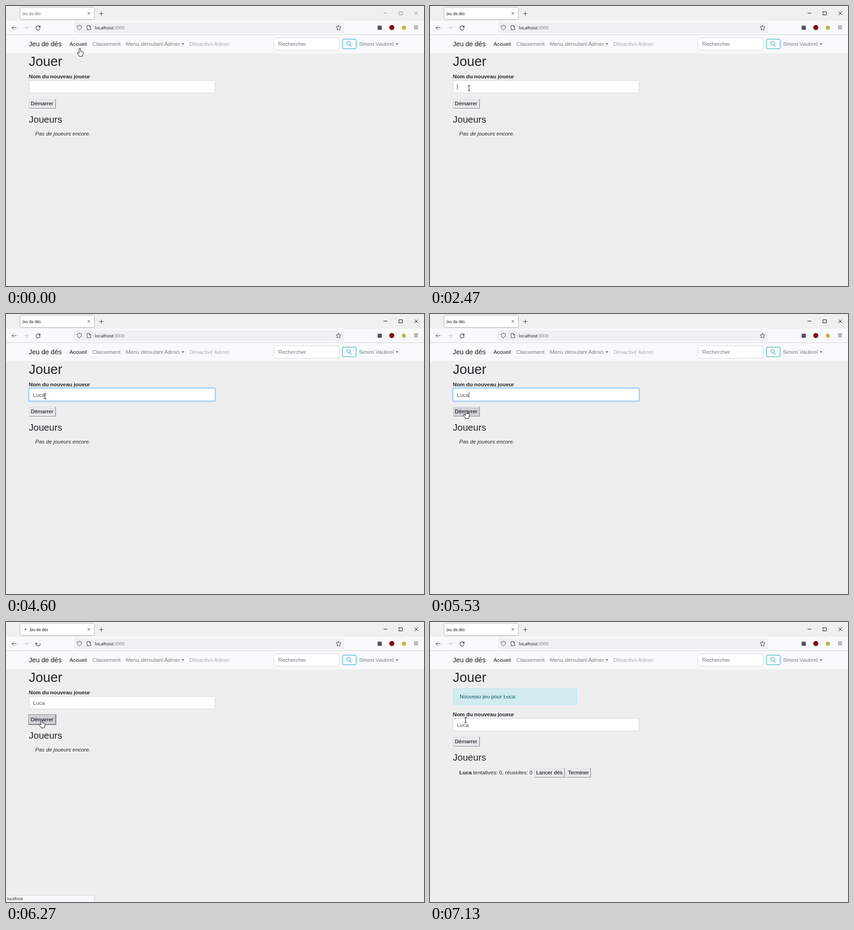
An HTML page for the animation above (8 s loop, 915 px wide and 612 px high).

```html
<!DOCTYPE html>
<html lang="fr">
<head>
<meta charset="utf-8">
<title>Jeu de dés</title>
<style>
  html, body { margin: 0; width: 100%; height: 100%; overflow: hidden; background: #eee; }
  svg { display: block; width: 915px; height: 612px; }
  text { font: 11.73px "Liberation Sans", Arial, sans-serif; fill: #212529; white-space: pre; }
  .ui { font-family: "Open Sans", "Noto Sans", sans-serif; font-size: 8.3px; fill: #0c0c0d; }
  .line { fill: none; stroke: #3d3d45; stroke-linecap: round; stroke-linejoin: round; }
  .input { fill: #fff; stroke: #ced4da; }
  .muted { fill: #7c7d7d; }
  .bold { font-weight: bold; }
  .cursor { fill: #fff; stroke: #000; stroke-linejoin: round; }
</style>
</head>
<body>
<svg viewBox="0 0 915 612">
  <!-- Browser chrome -->
  <rect width="915" height="32" fill="#f0f0f1"/>
  <rect y="32" width="915" height="30" fill="#f9f9fb"/>
  <rect y="62" width="915" height="1" fill="#d2d2d5"/>
  <rect x="30" y="2.5" width="164" height="28" rx="3.5" fill="#ddd"/>
  <rect x="30.5" y="2.5" width="163" height="27" rx="3" fill="#fff" stroke="#b0b0b4"/>
  <clipPath id="tabClip"><rect x="31" y="3" width="162" height="26" rx="3"/></clipPath>
  <g clip-path="url(#tabClip)"><circle id="burst" cx="42" cy="16" fill="#0a86e2"/></g>
  <circle id="throbber" cy="16.3" r="1.5" fill="#33333a"/>
  <text id="tabTitle" class="ui" y="19.5">Jeu de dés</text>
  <path class="line" d="M179 13.5l5 5m0-5l-5 5M204.5 16.5h8m-4 -4v8"/>
  <path id="windowButtons" class="line" d="M827 15.5h7M860.5 12.5h7v7h-7zM894.5 12.5l7 7m0-7l-7 7"/>
  <path class="line" d="M22.5 47.5H13m4.2-4.2L13 47.5l4.2 4.2"/>
  <path class="line" d="M39.5 47.5H49m-4.2-4.2l4.2 4.2l-4.2 4.2" style="stroke:#bbbbc0"/>
  <g id="reload">
    <path id="reloadArc" class="line" d="M4.3 1.5A4.5 4.5 0 1 1 3-3.3" pathLength="1" stroke-dasharray="1 2" stroke-width="1.2"/>
    <path d="M5-5.2V-.9H.7z" fill="#3d3d45"/>
  </g>
  <path id="stop" class="line" d="M66.5 43.5l8 8m0-8l-8 8" style="stroke:#b4b4ba"/>
  <rect x="149" y="36" width="591" height="23" rx="3" fill="#f0f0f4"/>
  <path class="line" d="M160.5 42q2.500 1.600 4.700 1.600q.5 6-4.700 9q-5.200-3-4.700-9q2.200 0 4.700-1.600zM178 42.500h4.500l2.800 2.800v6.700H178zm4.300 0v3h3"/>
  <text class="ui" x="194.5" y="51.3" style="font-size:9.7px">localhost<tspan fill="#77777e">:3000</tspan></text>
  <path class="line" d="M728 42l1.600 3.400 3.800.5-2.800 2.600.7 3.800-3.300-1.900-3.300 1.900.7-3.800-2.800-2.600 3.800-.5z"/>
  <rect x="813.5" y="43" width="9" height="9" fill="#55555e"/>
  <circle cx="844.5" cy="47" r="5.5" fill="#800610"/>
  <circle cx="871" cy="47.5" r="4.5" fill="#b9b743"/>
  <path class="line" d="M893.5 43.5h8m-8 3h8m-8 3h8"/>

  <!-- Navigation bar -->
  <rect y="63" width="915" height="40.5" fill="#f8f9fa"/>
  <text x="50" y="88" style="font-size:14.66px;fill:#191919">Jeu de dés</text>
  <text x="139" y="87" style="fill:#191919">Accueil</text>
  <text class="muted" x="189" y="87">Classement</text>
  <text class="muted" x="262.5" y="87">Menu déroulant Admin</text>
  <text x="401.5" y="87" style="fill:#adaeaf">Désactivé Admin</text>
  <path d="M384 81.5h6.5l-3.25 3.5zM853 81.5h6.5l-3.25 3.5z" fill="#6c6d6d"/>
  <rect class="input" x="586.5" y="69.5" width="143" height="27" rx="2.5"/>
  <text x="596" y="87" style="fill:#6c757d">Rechercher</text>
  <rect x="736.5" y="72.5" width="30" height="21" rx="2.5" fill="none" stroke="#17a2b8"/>
  <path d="M754 81.8a4 4 0 1 1-8 0a4 4 0 1 1 8 0m-1.2 3l4 4" fill="none" stroke="#17a2b8"/>
  <text class="muted" x="772.5" y="87">Simon Vaubrel</text>

  <!-- Page -->
  <text x="50" y="131" style="font-size:29.33px">Jouer</text>
  <g id="alert">
    <rect x="50.5" y="145.5" width="271" height="35.5" rx="2.5" fill="#d1ecf1" stroke="#bee5eb"/>
    <text x="65" y="167" style="fill:#0c5460">Nouveau jeu pour <tspan class="player"></tspan></text>
  </g>
  <g id="form">
    <text class="bold" x="50" y="158">Nom du nouveau joueur</text>
    <rect class="input" x="50.5" y="162.5" width="407" height="27.5" rx="2.5"/>
    <g id="ring" fill="none">
      <rect x="49" y="161" width="410" height="30.5" rx="3.5" stroke="#bfdeff" stroke-width="2.3"/>
      <rect x="50.5" y="162.5" width="407" height="27.5" rx="2.5" stroke="#80bdff"/>
    </g>
    <text id="typed" x="59.3" y="181" style="fill:#495057"></text>
    <rect id="caret" y="170" width="1" height="13" fill="#495057"/>
    <g id="startButton"></g>
    <rect id="buttonFocus" x="49.5" y="202.5" width="60" height="22" fill="none" stroke="#000" stroke-dasharray="1 1"/>
    <text x="50" y="255" style="font-size:20.53px">Joueurs</text>
    <text id="empty" x="64" y="283" style="font-style:italic">Pas de joueurs encore.</text>
    <g id="players">
      <text x="64" y="285"><tspan class="bold player"></tspan> tentatives: 0, réussites: 0</text>
      <g id="playerButtons"></g>
    </g>
  </g>

  <g id="status">
    <path id="statusBox" fill="#f9f9fb" stroke="#d4d4d8"/>
    <text id="statusText" class="ui" x="2.5" y="608"></text>
  </g>

  <g id="pointer">
    <path id="hand" class="cursor" d="M-1.5 1q0-1.5 1.500-1.500t1.500 1.500v5l4.300 1.100q1.900.5 1.700 2.500l-.8 4.400-1.200 3h-6.500l-1.500-2.800-3.300-4q-.2-2 1.800-1.700l2.500 2z"/>
    <path id="arrow" class="cursor" d="M0 0v13l3-2.800 2 4.700 2-.9-2-4.500h4z"/>
    <path id="beam" class="line" d="M-2.5-5.5h2l.5.5.5-.5h2M0-5v10M-2.5 5.5h2l.5-.5.5.5h2" style="stroke:#111"/>
  </g>
</svg>
<script>
  const NAME = 'Luca';
  const TICK = 200 / 3, TICKS = 120;
  const $ = id => document.getElementById(id);
  const set = (id, attrs) => {
    for (const key in attrs) $(id).setAttribute(key, attrs[key]);
  };
  const show = (id, on) => set(id, { visibility: on ? 'visible' : 'hidden' });
  const within = (k, from, to) => k >= from && k < to;

  const button = (x, y, w, label) => `<g transform="translate(${x} ${y})">
    <rect width="${w}" height="21" fill="#e9e9ed"/>
    <path d="M.5 21V.5H${w}" fill="none" stroke="#e0e0e4"/>
    <path d="M0 20.5H${w - .5}V0" fill="none" stroke="#84848e" stroke-width="1.2"/>
    <text x="4.2" y="14" style="fill:#000">${label}</text></g>`;
  $('startButton').innerHTML = button(50, 203, 59, 'Démarrer');
  $('playerButtons').innerHTML = button(228, 271, 67, 'Lancer dés') + button(298, 271, 54, 'Terminer');
  document.querySelectorAll('.player').forEach(el => el.textContent = NAME);
  const startFace = $('startButton').querySelector('rect');

  // Pointer path: tick, x, y
  const path = [
    [0, 161.5, 93], [5, 157, 91], [21, 157, 91], [22, 152.5, 95.5], [24, 140, 111],
    [28, 98, 165], [31, 85.5, 180], [77, 85.5, 180], [80, 82, 200],
    [83, 79, 211.5], [86, 78, 214.5], [TICKS, 78, 214.5]
  ];
  function pointerAt(k) {
    const i = path.findIndex(p => p[0] > k);
    const [a, b] = [path[i - 1], path[i]];
    const f = (k - a[0]) / (b[0] - a[0]);
    return [a[1] + (b[1] - a[1]) * f, a[2] + (b[2] - a[2]) * f];
  }

  function drawBrowser(k) {
    const active = k >= 37, loading = within(k, 91, 96);
    $('tabTitle').style.fill = active ? '#000' : '#5f5f66';
    set('tabTitle', { x: loading ? 52.5 : 36.5 });
    $('windowButtons').style.stroke = active ? '#000' : '#8b8b90';
    show('throbber', loading);
    set('throbber', { cx: 41.3 + 3.5 * Math.sin((k - 93) * .4) });

    const p = (k * TICK - 6420) / 375;
    const bursting = within(p, 0, 1);
    set('burst', { r: bursting ? 157 * p : 0, opacity: bursting ? .4 * (1 - p) : 0 });

    // The reload arrow unwinds before it becomes a stop cross
    const stopping = within(k, 95, 102);
    const unwind = within(k, 91, 95) ? k - 91 : 0;
    show('stop', stopping);
    show('reload', !stopping);
    set('reloadArc', { 'stroke-dashoffset': -.13 * unwind });
    set('reload', {
      transform: `translate(70.3 47.8) rotate(${-45 * unwind})`,
      opacity: within(k, 102, 107) ? .4 : 1
    });

    const hovering = within(k, 5, 25);
    show('status', hovering || loading);
    set('statusBox', { d: `M-1 597.5H${hovering ? 61 : 193.5}V613H-1z` });
    $('statusText').textContent = hovering ? 'localhost:3000' : 'localhost';
  }

  function drawPage(k, loaded) {
    show('alert', loaded);
    show('players', loaded);
    show('empty', !loaded);
    set('form', { transform: `translate(0 ${loaded ? 48 : 0})` });

    const letters = [57, 61, 65, 66].filter(tick => k >= tick).length;
    $('typed').textContent = NAME.slice(0, letters);
    set('caret', { x: 59 + Math.round(6.5 * letters) });
    show('caret', within(k, 37, 45) || within(k, 54, 69) || within(k, 78, 88));
    set('ring', { opacity: k < 41 ? 0 : Math.max(0, Math.min(1, (90 - k) / 3)) });
    show('buttonFocus', within(k, 88, 96));
  }

  function drawPointer(k, loaded) {
    const [x, y] = pointerAt(k);
    const onButton = !loaded && y >= 203;
    const shape = y < 98 || onButton ? 'hand' : loaded || within(y, 162, 191) ? 'beam' : 'arrow';
    for (const id of ['hand', 'arrow', 'beam']) show(id, id === shape);
    set('pointer', { transform: `translate(${x} ${y})` });
    startFace.setAttribute('fill', onButton ? (within(k, 88, 90) ? '#b1b1b9' : '#d0d0d7') : '#e9e9ed');
  }

  function frame() {
    const k = Math.floor((performance.now() + 4) / TICK) % TICKS;
    const loaded = k >= 96;
    drawBrowser(k);
    drawPage(k, loaded);
    drawPointer(k, loaded);
    requestAnimationFrame(frame);
  }
  frame();
</script>
</body>
</html>
```
